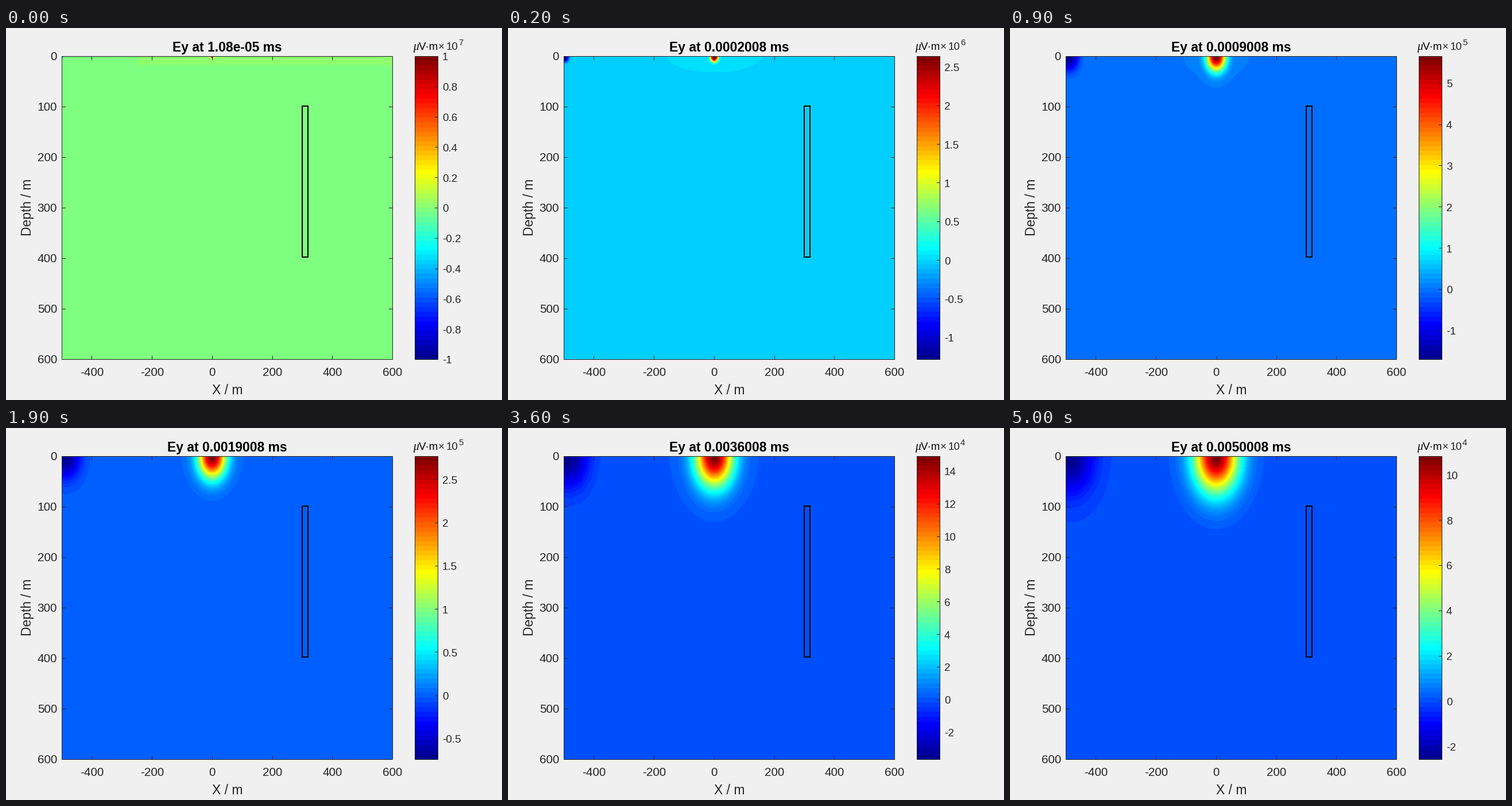
A matplotlib script for the animation above (5.1 s loop, 864 px wide and 648 px high).

```python
import math

import numpy as np
import matplotlib.pyplot as plt
from matplotlib.animation import FuncAnimation
from matplotlib.patches import Rectangle

W, H, FRAMES = 864, 648, 51
LEFT, RIGHT, TOP, BOTTOM = 97, 674, 49, 577
BAR_L, BAR_R = 712, 753
INK = "#262626"

# Colour limits times elapsed steps, as functions of the elapsed steps
KNOTS = np.log([1.008, 3.008, 9.008, 19.008, 36.008, 50.008])
PEAK = np.log([63.8, 47.5, 50.9, 52.6, 53.7, 54.1])
DIP = np.log([46.8, 18.2, 15.3, 14.05, 13.2, 12.9])

n = np.arange(1, 65)
JET = np.stack([np.clip(np.minimum(n - c, c + 48 - n) / 16, 0, 1)
                for c in (24, 8, -8)], axis=1)

X, Z = np.meshgrid((np.arange(LEFT, RIGHT) - 97) / 576 * 1100 - 500,
                   (np.arange(TOP, BOTTOM) - 49) / 528 * 600)

plt.rcParams["font.family"] = "Liberation Sans"
fig = plt.figure(figsize=(W / 72, H / 72), dpi=72, facecolor="#f0f0f0")
ax = fig.add_axes([0, 0, 1, 1])
ax.axis("off")


def pixel(v):
    """Centre of the pixel that holds v."""
    return math.floor(v) + 0.5


def line(xs, ys):
    return ax.plot(xs, ys, color=INK, lw=1, zorder=4, snap=False,
                   solid_capstyle="butt")[0]


def box(x0, y0, x1, y1, color=INK, lw=1):
    ax.add_patch(Rectangle((x0, y0), x1 - x0, y1 - y0, fill=False,
                           ec=color, lw=lw, zorder=4, snap=False))


def label(x, y, s, size, ha="left", color=INK, **kw):
    return ax.text(x, y, s, fontsize=size, ha=ha, va="baseline",
                   color=color, **kw)


def limits(k):
    if k == 0:
        return -1e7, 1e7
    t = k + 0.008
    u = math.log(t)
    hi = math.exp(np.interp(u, KNOTS, PEAK)) / t * 1e5
    lo = -math.exp(np.interp(u, KNOTS, DIP)) / t * 1e5
    return lo, hi


def field(k, lo, hi):
    if k == 0:
        f = np.where((X > -248) & (Z < 16), 1.0, -1.0)
        f += 0.8 * hi * np.exp(-(X / 4) ** 4 - (Z / 4) ** 4)
        f += 0.6 * lo * np.exp(-((X + 500) / 4) ** 4 - (Z / 4) ** 4)
        return f
    t = k + 0.008
    sx = 11 * t ** 0.48 * (1 - 0.3 / t ** 1.5)
    sz = 9.9 * math.sqrt(t) * (1 - 0.35 / t ** 0.77)
    power = 1 + min(1, 0.2 * (9 / t) ** 1.46) / 2

    def blob(x0):
        q = ((X - x0) / sx) ** 2 + (Z / sz) ** 2
        return np.exp(-q ** power), q

    pos, q = blob(0)
    if k == 1:
        pos *= 0.75 + 0.25 * np.cos(9 * np.sqrt(q))
    else:
        tail = 0.0109 * np.exp(-(X / (94 + 2 * t)) ** 2
                               - Z ** 2 / (196 * t))
        pos += tail * (1 - pos)
    neg, _ = blob(-500 + 16 * (1 - math.exp(-t / 9)))
    return hi * pos + lo * neg


def ticks(lo, hi):
    """Multiples of the smallest 1-2-5 step that leaves room for labels."""
    least = (hi - lo) / 11.5
    base = 10 ** math.floor(math.log10(least))
    step = next(m * base for m in (1, 2, 5, 10) if m * base >= least)
    return step * np.arange(math.ceil(lo / step - 1e-9),
                            math.floor(hi / step + 1e-9) + 1)


# Fixed parts
image = ax.imshow(np.zeros(X.shape + (3,)), extent=(LEFT, RIGHT, BOTTOM, TOP),
                  interpolation="nearest", aspect="auto", zorder=1)
ax.imshow(JET[::-1, None, :], extent=(BAR_L, BAR_R, BOTTOM, TOP),
          interpolation="nearest", aspect="auto", zorder=1)
ax.set_xlim(0, W)
ax.set_ylim(H, 0)

box(97.5, 49.5, 673.5, 577.5)
box(712.5, 49.5, 752.5, 577.5)
box(516, 136, 526, 399, "black", 2)

for v in range(-400, 601, 200):
    x = 97.5 + (v + 500) / 1100 * 576
    label(x, 606, str(v), 20.8, "center")
    if v < 600:
        line([pixel(x)] * 2, [577, 571])
        line([pixel(x)] * 2, [50, 56])
for v in range(0, 601, 100):
    y = 49.5 + v * 0.88
    label(89, y + 7, str(v), 20.8, "right")
    if 0 < v < 600:
        line([98, 104], [y, y])
        line([673, 667], [y, y])

label(385.5, 638, "X / m", 22.9, "center")
label(44, 312, "Depth / m", 22.9, "center", rotation=90,
      rotation_mode="anchor")
label(709, 38, "μ", 19.5, color="black", family="Liberation Serif",
      style="italic")
label(719, 38, "V·m", 18.75, color="black")
label(753, 38, "×", 18.75)
label(767, 38, "10", 18.75)
power_text = label(788, 30, "", 15)
title = label(385.5, 41, "", 22.9, "center", "black", weight="bold")
bar_marks = []


def draw(k):
    lo, hi = limits(k)
    span = hi - lo
    level = np.floor((field(k, lo, hi) - lo) / span * 64).astype(int)
    image.set_data(JET[np.clip(level, 0, 63)])

    seconds = "1.08e-05" if k == 0 else f"{k * 1e-4 + 8e-7:.7f}"
    title.set_text(f"Ey at {seconds} ms")

    while bar_marks:
        bar_marks.pop().remove()
    values = ticks(lo, hi)
    power = 7 if k == 0 else math.floor(math.log10(np.abs(values).mean()))
    power_text.set_text(str(power))
    for v in values:
        y = 49.5 + (hi - v) / span * 528
        if 52 < y < 575:
            bar_marks.append(line([747, 752], [pixel(y)] * 2))
        shown = round(v / 10 ** power, 3)
        bar_marks.append(label(760, y + 7, f"{shown:g}", 18.75))
    return [image, title, power_text, *bar_marks]


anim = FuncAnimation(fig, draw, frames=FRAMES, interval=100, repeat=True,
                     repeat_delay=0, blit=False)
plt.show()
```
